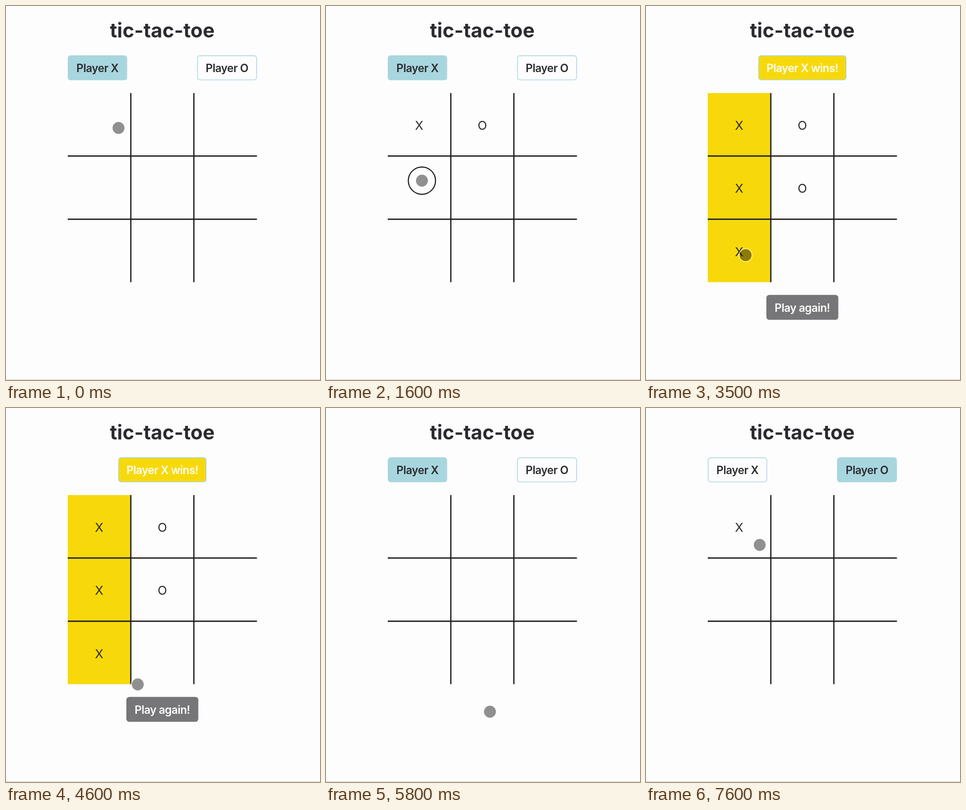
Recreate the animation shown at these times as an HTML page. Size 600x713 px, loop 8 s.

```html
<!DOCTYPE html>
<html lang="en">
<head>
<meta charset="utf-8">
<title>tic-tac-toe</title>
<style>
html, body { margin: 0; width: 100%; height: 100%; overflow: hidden; background: #fefdfe; }
svg { display: block; }
text { font-family: Inter, sans-serif; text-anchor: middle; fill: #2b2a2e; }
.title { font-size: 38px; font-weight: 700; }
.button text { font-size: 21px; font-weight: 600; letter-spacing: -.45px; }
.button rect { fill: #fefdfe; stroke: #a8d6de; stroke-width: 1.4px; }
.button.active rect { fill: #a8d6de; }
.button.win rect { fill: #f7d90b; }
.button.again rect { fill: #767577; stroke: #767577; }
.button.win text, .button.again text { fill: #fff; }
.mark { font-size: 23.5px; }
.lines { fill: none; stroke: #1b1a1d; stroke-width: 2.4px; }
#press { fill: none; }
</style>
</head>
<body>
<svg width="600" height="713" viewBox="0 0 600 713">
  <rect y="712" width="600" height="1" fill="#c9c9cb"/>
  <text class="title" x="298.5" y="59.5">tic-tac-toe</text>
  <rect id="streak" x="118" y="166" width="120.5" height="360.5" fill="#f7d90b"/>
  <path class="lines" d="M238.5 166V526.5M359 166V526.5M118 286H479.5M118 406.5H479.5"/>
  <g id="marks"></g>
  <g id="buttons"></g>
  <g id="pointer">
    <circle r="12.6" fill="none" stroke="#fff" stroke-opacity=".45" stroke-width="2"/>
    <circle r="11.4" fill="#000" fill-opacity=".43"/>
    <g id="press">
      <circle r="26" stroke="#fff" stroke-width="4"/>
      <circle r="26" stroke="#111014" stroke-width="2"/>
    </g>
  </g>
</svg>
<script>
const LOOP = 8000, STEP = 100;
const WIN = 3500, RESET = 5700;
const $ = id => document.getElementById(id);

function add(parent, tag, attrs, label = '') {
  const node = document.createElementNS('http://www.w3.org/2000/svg', tag);
  for (const name in attrs) node.setAttribute(name, attrs[name]);
  node.textContent = label;
  return parent.appendChild(node);
}

function button(label, left, top, width, kind = '') {
  const group = add($('buttons'), 'g', { class: 'button ' + kind });
  add(group, 'rect', { x: left + .7, y: top + .7, width: width - 1.4, height: 46.2, rx: 5 });
  add(group, 'text', { x: left + width / 2, y: top + 32.4 }, label);
  return group;
}

const playerX = button('Player X', 118, 94, 113.5);
const playerO = button('Player O', 365, 94, 114.5);
const winner = button('Player X wins!', 214.5, 94, 168.5, 'win');
const again = button('Play again!', 230, 550.7, 137.5, 'again');

// Moves: [placed at, cell, removed at]
const moves = [
  [100, 0, RESET], [900, 1, RESET], [1700, 3, RESET],
  [2800, 4, RESET], [WIN, 6, RESET], [7500, 0, LOOP]
].map(([from, cell, to], i) => {
  const x = 178 + cell % 3 * 120.7, y = 235.5 + Math.floor(cell / 3) * 120.6;
  const symbol = i < 5 && i % 2 ? 'O' : 'X';
  return { from, to, node: add($('marks'), 'text', { class: 'mark', x, y }, symbol) };
});

// Pointer travel: [start, end, x, y]
const travel = [
  [0, 0, 215, 232.5], [100, 500, 300, 233], [1200, 1500, 183.3, 333],
  [2300, 2600, 289, 333], [2900, 3200, 190.3, 475], [4400, 4800, 313.3, 579],
  [5900, 6100, 282.5, 441], [7000, 7300, 217.3, 261]
];
const presses = [700, 1500, 2600, 3300, 5500, 7300];

const within = (t, from, to) => t >= from && t < to;
const show = (node, on) => node.style.display = on ? '' : 'none';

function pointerAt(t) {
  let [, , x, y] = travel[0];
  for (const [start, end, toX, toY] of travel.slice(1)) {
    const p = Math.min(1, Math.max(0, (t - start) / (end - start)));
    const eased = p * p * (3 - 2 * p);
    x += (toX - x) * eased;
    y += (toY - y) * eased;
  }
  return [x, y];
}

function draw(t) {
  const won = within(t, WIN, RESET);
  const placed = moves.filter(m => within(t, m.from, m.to)).length;
  for (const m of moves) show(m.node, within(t, m.from, m.to));
  for (const node of [$('streak'), winner, again]) show(node, won);
  for (const node of [playerX, playerO]) show(node, !won);
  playerX.classList.toggle('active', placed % 2 === 0);
  playerO.classList.toggle('active', placed % 2 === 1);
  $('pointer').setAttribute('transform', `translate(${pointerAt(t)})`);
  show($('press'), presses.some(start => within(t, start, start + 200)));
}

const begin = performance.now();
function tick() {
  const t = (performance.now() - begin) % LOOP;
  draw(Math.floor(t / STEP) * STEP);
  requestAnimationFrame(tick);
}
tick();
</script>
</body>
</html>
```
